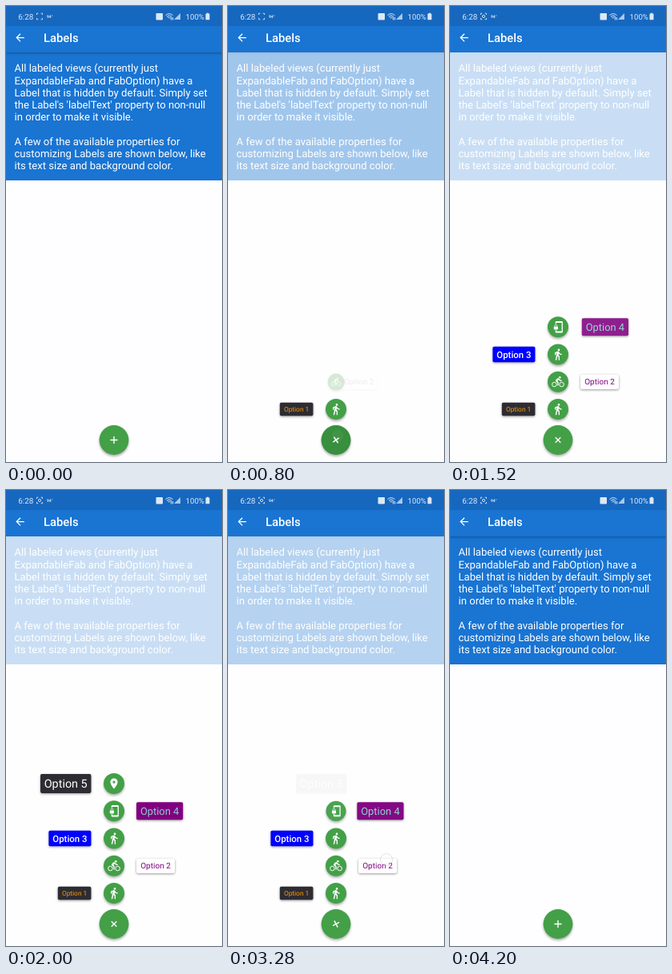
Recreate the animation shown at these times as an HTML page. Size 270x570 px, loop 4.56 s.

```html
<!DOCTYPE html>
<html lang="en">
<head>
<meta charset="utf-8">
<title>Labels</title>
<style>
  html, body { margin: 0; width: 100%; height: 100%; overflow: hidden; background: #fefdff; }
  svg { display: block; font-family: Roboto, "Open Sans", sans-serif; text-rendering: geometricPrecision; }
  .bar { filter: drop-shadow(0 1px 1.5px rgba(0, 0, 0, .3)); }
  .disc { filter: drop-shadow(0 2px 1.8px rgba(0, 0, 0, .32)); }
  .label { filter: drop-shadow(0 1.5px 1.5px rgba(0, 0, 0, .4)); }
  .status { fill: #dce8f6; }
  .line { fill: none; stroke: #dce8f6; }
</style>
</head>
<body>
<svg id="stage" width="270" height="570" viewBox="0 0 270 570">
  <rect width="270" height="570" fill="#fefdff"/>
  <rect y="50" width="270" height="168" fill="#1974d2"/>
  <rect class="bar" y="20" width="270" height="38" fill="#1974d2"/>
  <rect width="270" height="25" fill="#1667be"/>

  <g class="status">
    <text x="15.3" y="16.7" font-size="9.9">6:28</text>
    <text x="51" y="14.6" font-size="5" font-weight="700">94°</text>
    <rect x="187.5" y="9" width="8.5" height="8.5" rx="1"/>
    <path d="M218 9v8h-8z" opacity=".75"/>
    <text x="224.6" y="16.7" font-size="9.6">100%</text>
    <path d="M250.7 8.8h2.6v1h1.2v7.5h-5V9.8h1.2z"/>
  </g>
  <g class="line">
    <path d="M38.5 11v-1.8h1.8M43.7 9.2h1.8V11M45.5 15v1.8h-1.8M40.3 16.8h-1.8V15" stroke-width=".9"/>
    <circle id="ring" cx="42" cy="13" r="1.6" stroke-width=".9"/>
    <path d="M199.5 11.5q4.500-3.600 9 0M201 13.300q3-2.400 6 0M202.600 15q1.400-1 2.800 0M206.500 14v3.500M208.500 17.500V14" stroke-width="1"/>
  </g>

  <path transform="translate(9.700 31.700) scale(.656)" fill="#fff"
    d="M20 11H7.830l5.590-5.590L12 4l-8 8 8 8 1.410-1.410L7.830 13H20z"/>
  <text x="47" y="45.300" font-size="14.800" font-weight="500" fill="#fff">Labels</text>
  <g id="copy" font-size="13.100" fill="#fff"></g>
  <rect id="overlay" y="58" width="270" height="512" fill="#fff" opacity="0"/>
  <g id="options"></g>
  <g transform="translate(135 542.500)">
    <circle class="disc" r="18.400" fill="#43a047"/>
    <circle id="press" r="18.400" fill="#1b5e20" opacity="0"/>
    <path id="plus" d="M-4.600 0h9.200M0-4.600v9.200" fill="none" stroke="#fff" stroke-width="1.400"/>
  </g>
  <circle id="touch" r="7.500" fill="#fff" fill-opacity=".28" stroke="#777" stroke-opacity=".25" stroke-width=".8" opacity="0"/>
</svg>
<script>
const LOOP = 4560, STEP = 40, SLIDE = 43;
const OPEN_AT = 520, OPEN_GAP = 260, CLOSE_AT = 3204, CLOSE_GAP = 73;

const $ = id => document.getElementById(id);
const clamp = x => Math.max(0, Math.min(1, x));
const span = (t, start, length) => clamp((t - start) / length);
const ease = x => (1 - Math.cos(Math.PI * x)) / 2;
const overshoot = x => (x - 1) ** 2 * (4.5 * (x - 1) + 3.5) + 1;

function add(parent, tag, attrs, text) {
  const el = document.createElementNS(parent.namespaceURI, tag);
  for (const key in attrs) el.setAttribute(key, attrs[key]);
  if (text) el.textContent = text;
  return parent.appendChild(el);
}

const COPY = [
  "All labeled views (currently just",
  "ExpandableFab and FabOption) have a",
  "Label that is hidden by default. Simply set",
  "the Label's 'labelText' property to non-null",
  "in order to make it visible.",
  "",
  "A few of the available properties for",
  "customizing Labels are shown below, like",
  "its text size and background color."
];
COPY.forEach((line, i) => line && add($("copy"), "text", { x: 10.5, y: 82.4 + i * 15.23 }, line));

const ICONS = {
  walk: g => {
    add(g, "circle", { cx: 13.5, cy: 3.5, r: 2 });
    add(g, "path", { d: "M9.8 8.9L7 23h2.1l1.8-8 2.1 2v6h2v-7.5l-2.1-2 .6-3C14.8 12 16.800 13 19 13v-2c-1.900 0-3.500-1-4.300-2.400l-1-1.600c-.4-.6-1-1-1.700-1-.3 0-.5.1-.8.1L6 8.300V13h2V9.600z" });
  },
  bike: g => {
    add(g, "circle", { cx: 15.5, cy: 3.5, r: 2 });
    for (const cx of [5, 19])
      add(g, "circle", { cx, cy: 17, r: 4.25, fill: "none", stroke: "#fff", "stroke-width": 1.5 });
    add(g, "path", { d: "M10.8 10.5l2.4-2.4.8.8c1.3 1.3 3 2.1 5.1 2.1V9c-1.5 0-2.7-.6-3.6-1.5l-1.9-1.9c-.5-.4-1-.6-1.6-.6s-1.1.2-1.4.6L7.8 8.400c-.4.4-.6.9-.6 1.4 0 .6.2 1.1.6 1.4L11 14v5h2v-6.2z" });
  },
  lock: g => {
    add(g, "path", { d: "M19 1H9c-1.1 0-2 .9-2 2v3h2V4h10v16H9v-2H7v3c0 1.1.9 2 2 2h10c1.1 0 2-.9 2-2V3c0-1.1-.9-2-2-2z" });
    add(g, "rect", { x: 4, y: 11, width: 8, height: 6, rx: 1.2 });
    add(g, "path", { d: "M5.850 11.500V9.500a2.150 1.900 0 0 1 4.300 0V11.500", fill: "none", stroke: "#fff", "stroke-width": 1.3 });
  },
  pin: g => add(g, "path", {
    "fill-rule": "evenodd",
    d: "M12 2C8.130 2 5 5.130 5 9c0 5.250 7 13 7 13s7-7.750 7-13c0-3.870-3.130-7-7-7zM9.500 9a2.500 2.500 0 0 0 5 0a2.500 2.500 0 0 0-5 0z"
  })
};

// Options from the bottom up: the label sits left or right of its button.
const OPTIONS = [
  { y: 504, icon: "walk", x: 64.8, w: 41.6, h: 16.4, size: 8.4, bg: "#2c2c32", ink: "#ff9800" },
  { y: 469.8, icon: "bike", x: 163, w: 48, h: 18.2, size: 10, bg: "#ffffff", ink: "#800080" },
  { y: 435.5, icon: "walk", x: 53.4, w: 53, h: 19.6, size: 11.4, bg: "#0000ff", ink: "#ffffff", weight: 500 },
  { y: 401.3, icon: "lock", x: 163, w: 58.2, h: 22, size: 12.9, bg: "#800080", ink: "#8ccfcf" },
  { y: 367, icon: "pin", x: 43, w: 63.400, h: 23.8, size: 14.4, bg: "#2c2c32", ink: "#ffffff" }
].map((o, i) => {
  const label = add($("options"), "g", { class: "label" });
  add(label, "rect", { x: o.x, y: o.y - o.h / 2, width: o.w, height: o.h, rx: 1.8, fill: o.bg });
  add(label, "text", {
    x: o.x + o.w / 2, y: o.y + o.size * .36, "text-anchor": "middle",
    "font-size": o.size, "font-weight": o.weight || 400, fill: o.ink
  }, "Option " + (i + 1));
  const fab = add($("options"), "g", {});
  add(fab, "circle", { class: "disc", r: 13, fill: "#43a047" });
  ICONS[o.icon](add(fab, "g", { transform: "scale(.656) translate(-12 -12)", fill: "#fff" }));
  return { label, fab, y: o.y, side: o.x < 135 ? 1 : -1 };
});

const set = (el, attrs) => { for (const key in attrs) el.setAttribute(key, attrs[key]); };

function drawOption({ label, fab, y, side }, i, t) {
  const start = OPEN_AT + i * OPEN_GAP;
  const grow = span(t, start, 125), show = span(t, start, 250);
  const left = 1 - span(t, CLOSE_AT + (4 - i) * CLOSE_GAP, 78);
  const shift = side * SLIDE * (1 - overshoot(show) + 1 - left);
  set(label, { transform: `translate(${shift} 0)`, opacity: show * left });
  set(fab, {
    transform: `translate(135 ${y}) scale(${Math.max(0, overshoot(grow)) * left})`,
    opacity: Math.min(1, grow * 1.35) * left
  });
}

function draw(t) {
  OPTIONS.forEach((o, i) => drawOption(o, i, t));
  const veil = ease(span(t, OPEN_AT, 410)) - ease(span(t, 3235, 205));
  set($("overlay"), { opacity: .765 * veil });
  const turn = ease(span(t, OPEN_AT, 340)) - ease(span(t, 3210, 300));
  set($("plus"), { transform: `rotate(${-135 * turn})` });
  set($("press"), { opacity: .5 * (span(t, 460, 100) - span(t, 700, 200)) });
  set($("ring"), { opacity: t >= 1000 ? 1 : 0 });

  const first = t < 2000;
  const dot = first ? span(t, 460, 20) - span(t, 700, 120) : span(t, 2860, 20) - span(t, 3290, 110);
  set($("touch"), { cx: first ? 137 : 198, cy: first ? 537 : 462, opacity: dot });
}

let origin;
function tick(now) {
  origin ??= now;
  const t = (now - origin) % LOOP;
  draw(Math.floor(t / STEP) * STEP);
  requestAnimationFrame(tick);
}
draw(0);
requestAnimationFrame(tick);
</script>
</body>
</html>
```
